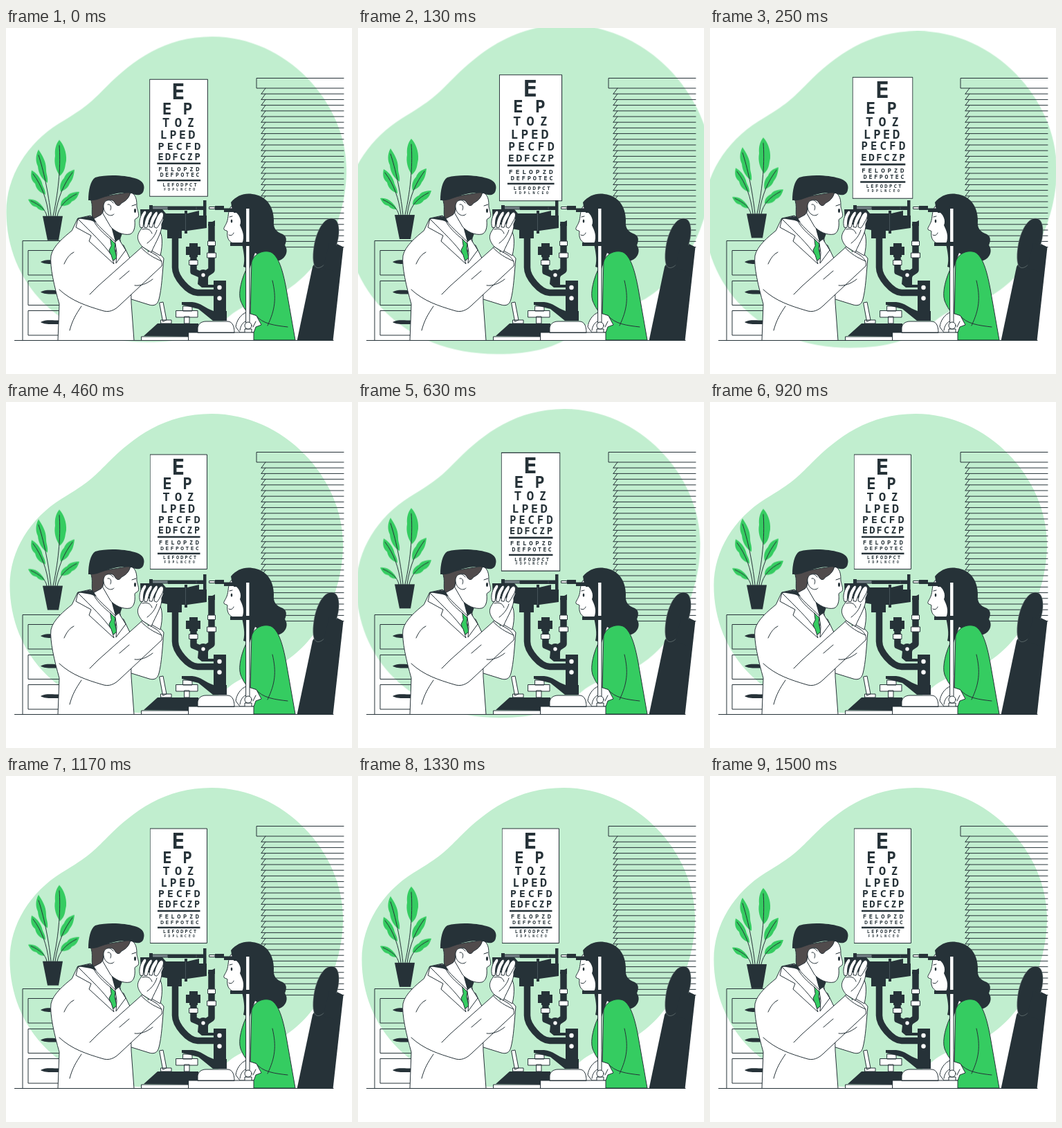
An HTML page that plays this animation: 500x500 px, repeating every 1540 ms.

```html
<!DOCTYPE html>
<html lang="en">
<head>
<meta charset="utf-8">
<title>Eye exam</title>
<style>
html, body { margin: 0; width: 100%; height: 100%; overflow: hidden; background: #fff; }
svg { display: block; width: 100vw; height: 100vh; }
svg * { stroke-linecap: round; stroke-linejoin: round; }
.l { fill: none; stroke: #263238; }
.w { fill: #fff; stroke: #263238; }
.d { fill: #263238; }
.g { fill: #35cc61; stroke: #263238; }
.leaf { fill: #35cc61; }
.tube { fill: none; stroke: #263238; stroke-width: 9.5; stroke-linecap: butt; }
text { font-family: "Noto Sans Mono", "DejaVu Sans Mono", monospace; font-stretch: 75%; font-weight: 700; text-anchor: middle; fill: #263238; }

/* 37 held poses per loop */
.beat, .bob { animation: beat 1540ms -3ms infinite; }
.bob { animation-name: bob; }
#blob { transform-origin: 248px 233px; }
#chart { transform-origin: 249.5px 158.7px; }
@keyframes beat {
  0% { transform: scale(1.021); animation-timing-function: steps(3); }
  8.108% { transform: scale(1.1); animation-timing-function: steps(7); }
  27.027% { transform: scale(1.003); animation-timing-function: step-end; }
  29.73% { transform: scale(1); animation-timing-function: step-end; }
  37.838% { transform: scale(1.004); animation-timing-function: steps(3); }
  45.946% { transform: scale(1.087); animation-timing-function: step-end; }
  48.649% { transform: scale(1.082); animation-timing-function: steps(3); }
  56.757% { transform: scale(1.001); animation-timing-function: step-end; }
  59.459%, 100% { transform: scale(1); }
}
@keyframes bob {
  0% { transform: translateY(-.3px); animation-timing-function: steps(17); }
  45.946% { transform: translateY(-9.8px); animation-timing-function: step-end; }
  48.649% { transform: translateY(-9.7px); animation-timing-function: steps(18); }
  97.297%, 100% { transform: translateY(-.1px); }
}
</style>
</head>
<body>
<svg viewBox="0 0 500 500">
  <path id="blob" class="beat" fill="#c1eecf" d="M5.500 265C5.500 215 35 168 80 140C120 116 125 110 147 88C185 50 230 17 297 17C402 17 487 110 487 205C487 275 453 345 400 377C375 390 345 393 322 412C290 440 255 449.500 205 449.500C80 449.500 5.500 363 5.500 265Z"/>

  <path id="blinds" class="l"/>

  <g id="cabinet">
    <path class="l" d="M90 307.500H24V451M90 321.500H32V357H90M90 365.500H32V400.500H90M90 408.500H32V444H90"/>
    <path class="d" d="M50 338C56 334 66 335.500 78 335.500V341C66 341 56 342 50 338ZM50 381.500C56 377.500 66 379 78 379V384.500C66 384.500 56 385.500 50 381.500ZM50 425C56 421 66 422.500 78 422.500V428C66 428 56 429 50 425Z"/>
  </g>

  <g id="plant" class="bob">
    <path class="leaf" d="M77 162C72 168 70 176 71 185C69 195 72 206 78 214C86 207 85 200 87 192C88 180 83 168 77 162ZM47 176C42 185 43 194 46 200C47 211 52 219 60 224C61 215 58 212 58 205C58 192 52 184 47 176ZM99 205C91 207 86 211 84 217C79 222 77 229 79 237C85 234 90 231 92 225C97 219 98 213 99 205ZM37 206C35 216 37 221 42 225C44 234 49 238 57 241C57 233 53 230 52 224C49 215 43 209 37 206ZM106 237C97 237 91 239 88 244C83 246 79 250 79 257C86 258 92 256 95 251C101 249 104 244 106 237ZM32 248C36 256 39 258 44 259C47 263 51 264 56 264C54 259 52 257 49 254C44 249 38 247 32 248Z"/>
    <path class="l" d="M77 170C79 195 77 232 68 272M47 184C54 205 61 236 65 272M96 209C84 225 75 244 71 272M39 211C52 228 59 248 62 272M102 240C86 248 77 258 74 272M36 250C49 256 57 262 59 272"/>
    <path class="d" d="M53 272H82L76 307H60Z"/>
  </g>

  <g id="chart" class="beat">
    <path class="w" d="M208.500 76H290.500V241.500H208.500Z"/>
    <path class="d" d="M219 193.700H280.500V196.200H219ZM219 217.800H280.500V220.200H219Z"/>
  </g>

  <path class="l" d="M12.500 451.500H473"/>

  <g id="chair">
    <path class="d" d="M466 306L487.500 316.500L472.500 452H420.500L443 345Z"/>
    <path d="M444 337C442 310 453 280 467 275.500C478 273 482 283 481 297C480 316 468 337 456 345C449 349 445 345 444 337Z" fill="#263238" stroke="#8b9996" stroke-width=".5"/>
    <path class="d" d="M467 311L487 316.500L480 353L458 347Z"/>
  </g>

  <g id="patient">
    <path class="g" d="M349 345C341 360 335 382 339 394C343 404 347 410 352 413Z"/>
    <path class="w" d="M342 309L345 322L355 338L370 325V310Z"/>
    <path class="w" d="M325 258C320 266 322 274 319 281C317 286 314 289 315 291C316 293 319 292 320 294C319 302 321 308 328 311C336 313 343 310 350 307L352 266Z"/>
    <path class="d" d="M325 252C333 242 345 238 356 240C376 242 387 258 387 278C386 290 390 294 400 298C407 302 405 309 403 314C409 322 404 333 395 336C384 340 370 331 360 325L352 348L343 345C346 334 343 322 341 312C346 300 341 292 338 285C341 279 338 268 327 263Z"/>
    <path class="g" d="M355 338C358 326 372 320 383 324C394 330 400 350 405 377L418 451H357L353 420Z"/>
    <path class="l" d="M385 365C391 390 389 407 378 430M361 415C370 428 390 430 407 432"/>
    <path class="w" d="M347 411C339 414 333 423 332 432L338 440H358L361 432L369 429L362 416Z"/>
    <path class="l" d="M338 437C339 430 342 426 346 424M357 432L361 424"/>
    <path class="l" d="M322 299C325 301 328 299 329 296M323 273L327 272"/>
    <ellipse class="d" cx="326" cy="279" rx="1.300" ry="2.500"/>
  </g>

  <g id="lamp">
    <!-- head rest -->
    <path class="d" d="M302 257H315V260.500H329V266H315V263H302ZM329 261H350V267H329ZM324 310H354V315H324Z"/>
    <path class="w" d="M294 258.500H302V261.500H294Z"/>
    <path class="w" d="M347 257H352V440H347Z"/>
    <path class="d" d="M346.500 256H352.500V261H346.500ZM346.500 309H352.500V315H346.500Z"/>
    <path class="w" d="M345 440V435H355V440Z"/>
    <circle class="w" cx="350" cy="430" r="5"/>

    <!-- base -->
    <path class="d" d="M199 445L219 427H278V441H264V446Z"/>
    <path class="w" d="M196 446H264V451.500H196ZM222 397L227 396L232 422L227 424ZM224 422H239V427H224ZM258 417H265V427H258ZM256 402H269V409H256ZM246 408.500H277V418H246Z"/>
    <path class="d" d="M254 396H269C282 397 288 405 300 409H319V423H299L278 406L254 400Z"/>
    <path class="w" d="M277 440V433C278 427 283 424 289 424H320C326 424 330 429 330 440ZM264 440H358V451.500H264Z"/>

    <!-- arms -->
    <path class="tube" d="M244.500 298V346C244.500 360 263 382 277 382.500H304M297 280V350L285 358L271 352V320"/>
    <path class="d" d="M292 283L302 278V286H292ZM260 316H265V311H277V316H281V328H277V331H265V328H260ZM300 365H318V411H300ZM278 360H292V371H300V375H283L277 370Z"/>
    <path class="w" d="M292 308H302.500V314.500H292ZM291 325H303.500V332H291ZM265 335.500H277V342.500H265Z"/>
    <circle class="d" cx="285" cy="357" r="8"/>
    <circle cx="285" cy="357" r="2.700" fill="#fff"/>
    <circle cx="308.500" cy="375" r="3.200" fill="#fff"/>
    <circle cx="308.500" cy="390.500" r="3.200" fill="#fff"/>

    <!-- scope -->
    <path class="d" d="M194 262H226L231 268H258V264H262V268L279 264V271H290V289L262 293V297H258V293H254V304H233V292L222 290L195 285ZM234 257.500H285V249H289.500V271H285V263H234ZM207 256H212V263H207Z"/>
    <path d="M212 258H234V262H212Z" fill="#78858a" stroke="#263238"/>
    <path d="M259.500 268V293M275 259V262" stroke="#66757b" fill="none" stroke-width=".5"/>
  </g>

  <g id="doctor">
    <path class="w" d="M208 318L222 326L228 333C226 354 225 377 221 392C219 400 214 402 207 400L178 391Z"/>
    <path class="w" d="M213 306L221 292C226 297 227 312 223 329L209 321Z"/>
    <path class="w" d="M140 262L124 273C128 289 140 299 152 307L166 312L163 293Z"/>
    <path class="d" d="M152 287L168 297L165 305L158 309Z"/>
    <path class="w" d="M142 247L182 238C189 243 189 251 189 258C190 264 193 270 191 273C189 276 186 275 186 278C187 288 185 296 179 298C169 300 157 294 151 287L140 268Z"/>
    <path d="M122 247L180 237C178 246 173 250 167 253C164 258 160 258 157 252C154 247 147 247 143 252C139 258 143 264 137 270L126 276C122 268 127 257 122 247Z" fill="#504b4c" stroke="#263238"/>
    <path class="w" d="M155 253C150 245 140 249 141 259C142 269 151 274 156 269"/>
    <path class="l" d="M147 255C151 254 153 258 151 263"/>
    <path class="d" d="M119 249C119 235 122 220 129 216C147 211 172 213 186 217C197 220 201 226 199 234C198 241 191 243 184 240C174 236 157 239 146 243C137 246 129 250 122 249Z"/>
    <ellipse class="d" cx="186.500" cy="264" rx="1.500" ry="3"/>
    <path class="l" d="M182 257L188 255"/>

    <!-- coat -->
    <path class="w" d="M104 275L122 271C132 286 146 297 158 309L170 314L180 335L181 397L185 451.500H75L77 399C70 374 63 345 65 329C68 315 84 302 95 293Z"/>
    <path class="w" d="M123 272C130 288 142 298 152 306L160 315L156 336L104 276Z"/>
    <path class="d" d="M104 275L125 272L131 281L122 278Z"/>
    <path class="g" d="M151 305L158 312L157 319L160 332L154 337L149 321L152 315Z"/>
    <path class="w" d="M104 276L101 288L123 300L120 308L156 341L152 328C141 312 124 296 104 276Z"/>
    <path class="w" d="M158 309L163 305L173 321L159 340L160 325Z"/>
    <path class="l" d="M109 402C101 414 96 422 92 437M84 341C88 332 92 327 98 324"/>

    <!-- near arm -->
    <path d="M78 379L133 373L197 316L225 344L165 400L148 409Z" fill="#fff"/>
    <path class="l" d="M77 378C95 395 118 402 138 408C149 412 157 408 165 400L225 344C227 338 222 332 218 329L197 316L133 373"/>
    <path class="l" d="M133 373L121 385M195 317C203 326 213 332 225 337M186 372C194 373 203 370 212 363M164 363L178 351"/>

    <!-- near hand -->
    <path class="w" d="M197 316C188 306 189 299 195 291L201 281C208 286 214 284 219 279L225 270C229 272 228 277 225 283C226 295 217 308 210 324Z"/>
    <g class="w">
      <path d="M194 288C191 281 194 270 200 264C204 264 203 268 201 271C198 276 199 282 198 288Z"/>
      <path d="M200 288C199 279 204 269 209 265C213 265 211 270 209 273C206 278 206 283 204 288Z"/>
      <path d="M207 287C207 279 212 269 217 265C221 265 219 271 217 274C214 279 213 283 211 288Z"/>
      <path d="M214 287C215 279 219 269 224 266C229 266 228 273 225 278C222 283 221 286 218 289Z"/>
    </g>
    <path class="l" d="M197 291C204 289 209 291 211 297M204 311C211 306 216 299 218 292"/>
  </g>
</svg>
<script>
// header box, then sawtooth slats
let blinds = "M488 72.500H362V87H488";
for (let i = 0; i < 28; i++) {
  const y = 87 + i * 8.2;
  const left = i > 26 ? 405 : 369;
  blinds += `M375 ${y}L369 ${y + 8.2}M${left} ${y + 8.2}H488`;
}
document.getElementById("blinds").setAttribute("d", blinds);

// letters, cap height, baseline, first x, pitch
const rows = [
  ["E", 22.5, 104.5, 249, 0],
  ["EP", 16, 125.5, 233, 29],
  ["TOZ", 12, 143, 231.5, 17.5],
  ["LPED", 11.5, 159.5, 228.5, 13.2],
  ["PECFD", 10.5, 175.2, 224.5, 12.9],
  ["EDFCZP", 9.5, 190.3, 224, 10.4],
  ["FELOPZD", 6.2, 206, 223.5, 8.8],
  ["DEFPOTEC", 5.6, 214.3, 225.7, 7.25],
  ["LEFODPCT", 4.8, 227.4, 229, 6.3],
  ["FDPLNCEO", 3.3, 233, 230, 5.9]
];
const chart = document.getElementById("chart");
for (const [word, cap, y, x, pitch] of rows) {
  const t = document.createElementNS("http://www.w3.org/2000/svg", "text");
  t.setAttribute("x", [...word].map((c, i) => x + i * pitch).join(" "));
  t.setAttribute("y", y);
  t.setAttribute("font-size", cap / 0.714);
  t.textContent = word;
  chart.append(t);
}
</script>
</body>
</html>
```
